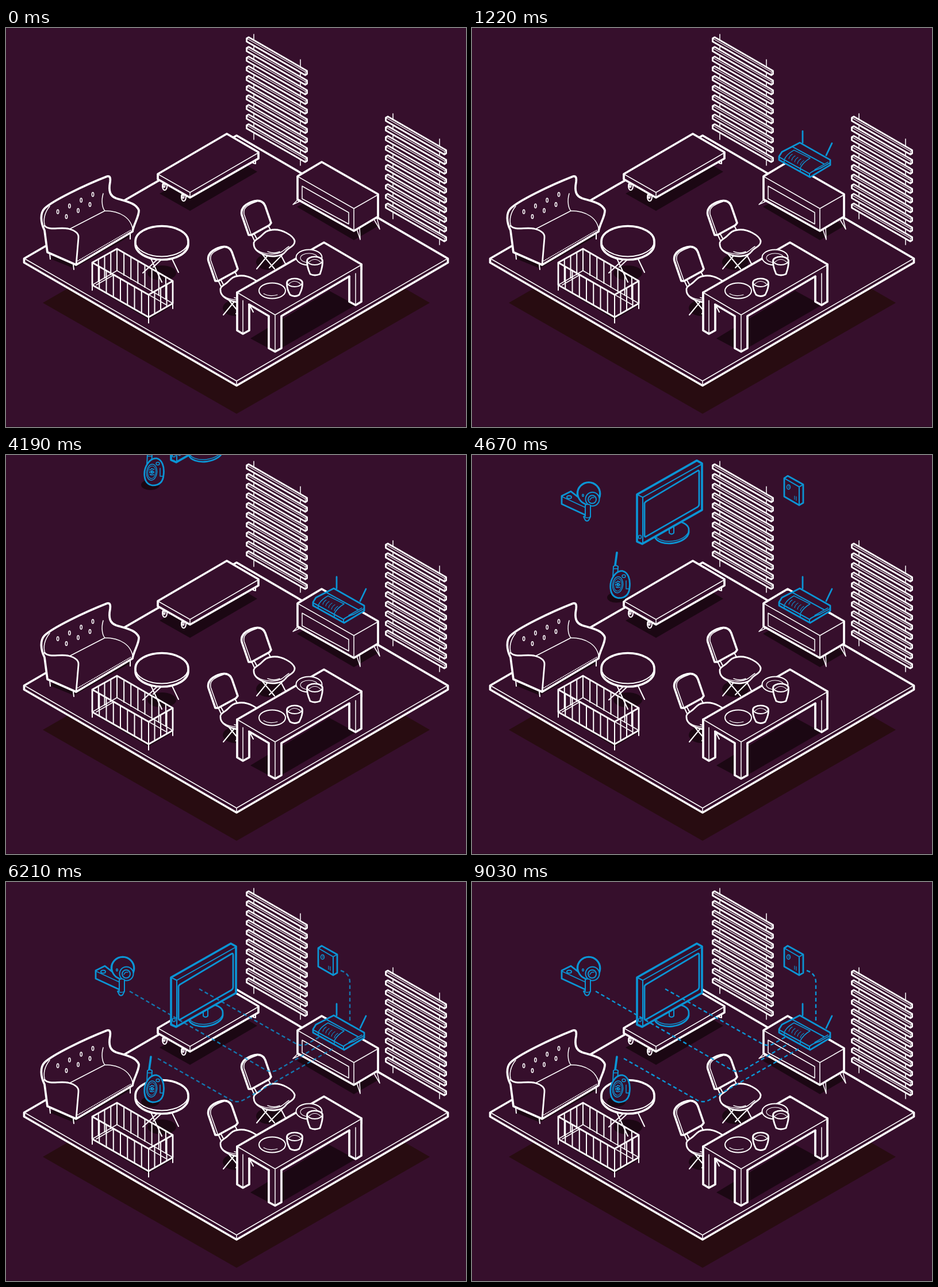
Write an HTML page that moves like this. It is 800 px wide and 694 px high and loops after 9730 ms.

```html
<!DOCTYPE html>
<html lang="en">
<head>
<meta charset="utf-8">
<title>Connected home</title>
<style>
  html, body { margin: 0; width: 100%; height: 100%; overflow: hidden; background: #360f2c; }
  svg { display: block; width: 100vw; height: 100vh; }
  #stage { fill: #360f2c; stroke: #fff; stroke-width: 1.5; stroke-linejoin: round; stroke-linecap: round; }
  .thick { stroke-width: 3.7; }
  .mid { stroke-width: 2.8; }
  .soft { stroke-width: 2; }
  .thin { stroke-width: 1.1; }
  .line { fill: none; }
  .shade { fill: #1b0713; stroke: none; }
  .blue { stroke: #0b95d5; }
  #links { fill: none; stroke-width: 2.4; stroke-dasharray: 6.5 4.5; stroke-linecap: butt; }
  #waves { fill: #0b95d5; stroke: none; }
</style>
</head>
<body>
<svg viewBox="0 0 800 694">
<defs>
  <g id="chair">
    <ellipse class="shade" cx="458" cy="407" rx="23" ry="14"/>
    <path class="line soft" d="M459 391L436 419M446 394L467 419M477 393L488 414M484 391L458 417"/>
    <path class="line soft" d="M427 359L433 372M431 357L437 368M456 344L461 353"/>
    <path class="mid" d="M431 376C430 370 436 368 441 364C448 359 450 352 463 351C480 349 499 361 502 370C503 380 490 382 486 389C479 398 461 399 448 394C438 390 431 385 431 376Z"/>
    <path class="line" d="M432 381C437 391 456 394 466 393C482 392 484 384 492 380M455 389Q466 393 476 389"/>
    <path class="thick" d="M422 360L410 325C408 315 414 308 426 303C438 298 447 300 451 310L461 339L458 343L427 360Z"/>
    <path class="line" d="M426 358L414 324C412 314 418 308 436 302"/>
  </g>
  <g id="blind">
    <path class="line" d="M431 11V194M512 55V239"/>
    <g id="slats"></g>
  </g>
</defs>
<g id="stage">
  <rect y="693" width="800" height="1" fill="#2a0c22" stroke="none"/>
  <path d="M64 478L401 284L737 478L401 671Z" fill="#280c11" stroke="none"/>

  <path class="thick" d="M31.500 401L401 187L768.500 401V408L401 622L31.500 408Z"/>
  <path class="line" d="M32 401L401 614L768 401M401 614V622"/>

  <use href="#blind"/>
  <use href="#blind" x="242" y="138"/>

  <!-- low bench -->
  <path class="shade" d="M267 288L320 318L437 250L390 222Z"/>
  <g class="soft">
    <ellipse cx="276" cy="275" rx="4" ry="7"/><ellipse cx="275" cy="274" rx="1.500" ry="3"/>
    <ellipse cx="309" cy="294" rx="4" ry="7"/><ellipse cx="308" cy="293" rx="1.500" ry="3"/>
    <path d="M430 231V235L434 236V229Z"/>
  </g>
  <path class="thick" d="M264 254L384 184L439 216V227L320 295L264 263Z"/>
  <path class="line" d="M264 254L320 286L439 217M320 286V295"/>

  <!-- cabinet -->
  <path class="shade" d="M506 311L605 369L648 344L549 288Z"/>
  <path d="M507 299L499 307L510 302ZM610 350L616 368L615 347ZM640 333L650 350L645 330Z"/>
  <path class="thick" d="M507 258L549 233L647 289V328L605 353L507 298Z"/>
  <path class="line" d="M507 258L605 314L647 290M605 314V353"/>
  <path class="line" d="M515 275L596 321V341L515 297Z"/>

  <!-- sofa -->
  <path class="shade" d="M76 401L118 418L218 361L200 350L90 390Z"/>
  <path class="line soft" d="M76 392L77 402M117 412L118 420M216 357V367"/>
  <path class="thick" d="M72 390L67 352C60 338 59 322 67 314C80 301 135 274 176 258C181 257 182 261 181 268C178 284 181 292 191 296C209 302 226 304 231 317C232 327 222 341 220 354L122 412Z"/>
  <path class="line mid" d="M67 344C76 353 92 346 108 349C120 352 127 357 126 365L122 412"/>
  <path class="line" d="M76 310C67 321 64 334 68 345M169 288C165 302 168 314 172 318C198 318 219 330 221 354M110 350L172 318"/>
  <path class="line" d="M125 405L218 351" stroke-dasharray="1 2"/>
  <g id="buttons"></g>

  <!-- round table -->
  <ellipse class="shade" cx="271" cy="426" rx="25" ry="13"/>
  <path class="line soft" d="M266 400L238 426M252 401L271 442M288 400L300 425M270 403L256 416"/>
  <path class="thick" d="M225 371A46 26.500 0 0 1 317 371V376A46 27 0 0 1 225 376Z"/>
  <ellipse class="line soft" cx="271" cy="371" rx="46" ry="26.500"/>

  <!-- cot -->
  <path class="shade" d="M155 452L248 507L291 482L193 424Z"/>
  <path d="M150 447L193 422L290 479L248 503Z" stroke="none"/>
  <path class="line" d="M150 447L193 422L290 479M157 447L188 429L278 481"/>
  <path class="line soft" id="bars"/>
  <path class="line mid" d="M150 408L193 384L290 440L248 464ZM150 408V447L248 503L290 479V440"/>
  <path class="line soft" d="M150 447V456M248 464V513M290 479V488M193 384V422"/>

  <use href="#chair"/>
  <use href="#chair" x="-58" y="80"/>

  <!-- dining table -->
  <path class="shade" d="M425 540L468 563L608 482L562 457Z"/>
  <g class="thick">
    <path d="M402 460V526L412 532L423 526V470Z"/>
    <path d="M597 425V476L608 482L618 476V411Z"/>
    <path d="M457 495V557L468 563L479 557V495Z"/>
    <path d="M402 460L553 373L618 411V420L468 507L402 468Z" stroke="none"/>
    <path class="line" d="M423 481L457 501M479 501L597 432M402 468V460L553 373L618 411V420"/>
  </g>
  <path class="line" d="M402 460L468 499L618 412M468 499V563M412 474V531M608 427V481"/>
  <g class="soft">
    <ellipse cx="463" cy="457" rx="23" ry="13.500"/>
    <path class="line thin" d="M448 462Q458 468 472 464"/>
    <ellipse cx="527" cy="399" rx="22.500" ry="13.500"/>
    <ellipse class="line thin" cx="527" cy="400" rx="15" ry="8"/>
    <path class="mid" d="M488.500 443C488 455 492 460 494 464Q502 469 510 464C512 459 516 454 515.500 443A13.500 7 0 0 0 488.500 443Z"/>
    <ellipse cx="502" cy="443" rx="13" ry="7"/>
    <path class="line thin" d="M492 445Q502 436 512 445"/>
    <path class="mid" d="M523.500 405C523 415 527 423 529 428Q537 432 546 428C548 422 551 415 550.500 405A13.500 7 0 0 0 523.500 405Z"/>
    <ellipse cx="537" cy="405" rx="13" ry="7"/>
    <path class="line thin" d="M527 407Q537 398 547 407"/>
  </g>

  <g class="blue">
    <g id="tv">
      <path class="mid" d="M317 232A30 17 -8 0 1 377 228V232A30 17 -8 0 1 318 240Z"/>
      <path class="line" d="M318 236A30 17 -8 0 0 377 229"/>
      <path class="soft" d="M343 216V233Q347 237 351 233V212Z"/>
      <path class="thick" d="M287 166L391 107L400 112V193L296 252L287 248Z"/>
      <path class="line soft" d="M287 166L297 171L400 113M297 171V251"/>
      <path class="line mid" d="M303 178L392 125Q395 123 395 127V183Q395 186 392 188L303 239Q300 241 300 237V182Q300 180 303 178Z"/>
      <ellipse class="line" cx="292" cy="240" rx="2.500" ry="3"/>
    </g>
    <g id="camera">
      <circle class="thick" cx="203" cy="150" r="19.500"/>
      <path class="mid" d="M156 154L172 146L205 172V188L197 187L156 168Z"/>
      <path class="line" d="M156 155L197 174M172 147L193 163"/>
      <ellipse class="soft" cx="169" cy="156" rx="4" ry="2.500"/>
      <circle cx="203" cy="150" r="18" stroke="none"/>
      <path class="line mid" d="M184 147A19.500 19.500 0 0 0 197 168"/>
      <circle class="soft" cx="209.500" cy="159.500" r="12"/>
      <circle class="soft" cx="209" cy="160" r="7"/>
      <path class="line" d="M205 161Q207 156 212 157"/>
      <ellipse class="line" cx="193" cy="153" rx="1.300" ry="2"/>
      <path class="soft" d="M197 170V189L194 190L197 196Q200 199 203 196L206 190V170Q201 167 197 170Z"/>
      <path class="line" d="M195 190Q200 194 206 190"/>
    </g>
    <g id="sensor">
      <path class="mid" d="M543 115L549 111L576 126V158L569 162L543 147Z"/>
      <path class="line soft" d="M543 115L569 130L576 126M569 130V162"/>
      <ellipse class="line" cx="550.500" cy="130.500" rx="3" ry="4"/>
      <path class="line thin" d="M551 128V132M561 146V152M564 147V154"/>
    </g>
    <g id="monitor">
      <ellipse class="shade" cx="251" cy="382" rx="16" ry="9"/>
      <path class="line thick" d="M252 304L249 326"/>
      <path class="soft" d="M246 328Q250 325 254 328L253 348H245Z"/>
      <path class="line" d="M246 332H253"/>
      <path class="mid" d="M241 367C239 352 249 335 262 336C271 338 276 350 274 365C273 378 266 383 255 383C247 382 242 376 241 367Z"/>
      <ellipse class="line" cx="253.500" cy="360" rx="9" ry="14" transform="rotate(6 253.500 360)"/>
      <ellipse class="line thin" cx="253.500" cy="360" rx="7" ry="11" transform="rotate(6 253.500 360)"/>
      <path class="line mid" d="M250 355L257 365M257 354L250 366M253.500 353V367M249 360H258" stroke-dasharray="2 1.500" stroke-linecap="butt"/>
      <ellipse class="line" cx="264" cy="345" rx="3" ry="2.500"/>
      <path class="line" d="M268 353V367H273"/>
    </g>
    <g id="links">
      <path d="M215 190L450 326Q462 333 474 326L551 281"/>
      <path d="M336 186L504 281Q515 287 525 281L546 269"/>
      <path d="M264 307L389 378Q402 386 415 378L572 288"/>
      <path d="M582 154Q598 159 598 175V241"/>
    </g>
    <g id="router">
      <path class="line mid" d="M575 212V232M626 233L616 254"/>
      <path class="mid" d="M534 256L539 248L570 232L623 262V271L588 292L534 262Z"/>
      <path class="line soft" d="M534 257L587 286Q592 281 605 277L623 267M557 239L612 269M587 286V291"/>
      <path class="line" d="M543 262Q546 253 560 245L588 259Q576 266 571 276M543 262V266M571 276V281M596 279L619 266"/>
      <path class="line thin" id="vents"/>
    </g>
    <g id="waves"></g>
  </g>
</g>
</svg>
<script>
const LOOP = 9730;
const $ = id => document.getElementById(id);
const clamp = v => Math.max(0, Math.min(1, v));
const range = n => [...Array(n).keys()];

// Repeated details
$('slats').innerHTML = range(10).map(i => `<g transform="translate(0 ${i * 16.8})">
  <path class="mid" d="M418.500 18L422 16L523.500 74.500V80L520.500 82L418.500 23.500Z"/>
  <path class="line thin" d="M418.500 18L520.500 76.500L523.500 75M520.500 76.500V82"/></g>`).join('');

$('buttons').innerHTML = range(7).map(i => {
  const row = i < 4 ? 0 : 1, n = row ? i - 4 : i;
  const x = row ? 146 - n * 20.5 : 151 - n * 20.3;
  const y = row ? 307 + n * 10.5 : 289.5 + n * 10;
  return `<ellipse class="line" cx="${x}" cy="${y}" rx="1.7" ry="3.5"/>`;
}).join('');

const rails = (x0, y0, x1, y1, n, h) => range(n - 1).map(i => {
  const k = (i + 1) / n;
  return `M${x0 + (x1 - x0) * k} ${y0 + (y1 - y0) * k}v${h}`;
}).join('');
$('bars').setAttribute('d',
  rails(150, 408, 248, 464, 8, 39) + rails(248, 464, 290, 440, 4, 39) +
  rails(150, 408, 193, 384, 4, 39) + rails(193, 384, 290, 440, 8, 39));

$('vents').setAttribute('d',
  range(5).map(i => `M${551 + i * 5} ${260 + i * 2.8}q1 -5 6 -8`).join(''));

const ARC = 'M-.15-.92C.08-1.08 .38-1 .56-.68C.36-.94 .08-1.035-.15-.92Z';
$('waves').innerHTML = range(5).map(() => `<path d="${ARC}"/>`).join('');
const arcs = [...$('waves').children];

// Fall speed of each device in px per ms; all land together
const drops = { tv: .296, camera: .2515, sensor: .227, monitor: .408 };
const LAND = 5000;

const shift = (id, y) => $(id).setAttribute('transform', `translate(0 ${y})`);

function pulse(t) {
  if (t < 5730) return 0;
  if (t >= 9030) return 1;
  const p = (t - 5730) % 990;
  return p < 330 ? p / 330 : 1 - (p - 330) / 660;
}

function draw(t) {
  shift('router', -Math.max(0, 1380 - t) * .205);
  $('router').setAttribute('opacity', clamp((t - 980) / 120));

  arcs.forEach((arc, k) => {
    const r = 88 * 1.38 ** ((t - 2240) / 265 - k);
    const shown = r > 32 && r < 211;
    const fade = r < 66 ? (r - 32) / 34 : (66 / r) ** 2;
    arc.setAttribute('opacity', shown ? fade : 0);
    arc.setAttribute('transform', `translate(622.6 245) scale(${shown ? r : 1})`);
  });

  for (const id in drops) shift(id, -Math.max(0, LAND - t) * drops[id]);
  $('links').setAttribute('opacity', pulse(t));
}

const start = performance.now();
function tick() {
  draw((performance.now() - start) % LOOP);
  requestAnimationFrame(tick);
}
draw(0);
requestAnimationFrame(tick);
</script>
</body>
</html>
```
